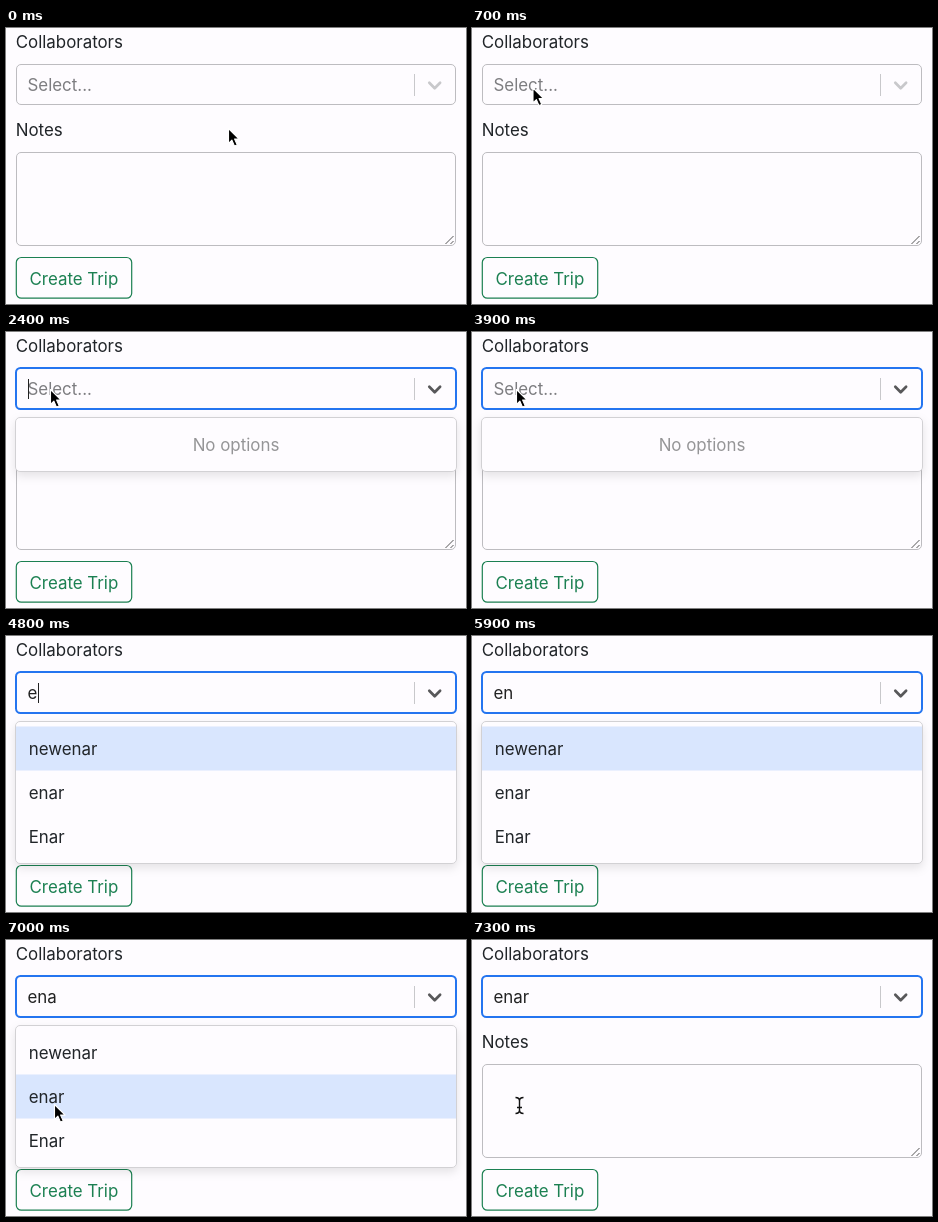
Animation, 460 px wide and 276 px high, one loop 8 s. Source, as an HTML page:

```html
<!DOCTYPE html>
<html lang="en">
<head>
<meta charset="utf-8">
<style>
  html, body { margin: 0; width: 460px; height: 276px; overflow: hidden; background: #fefcff; }
  svg { display: block; font: 16.9px Inter, sans-serif; fill: #212529; }
  .box { fill: #fefcff; stroke: #bdbcc0; }
  .menu { filter: drop-shadow(0 4px 5px rgba(0, 0, 0, .1)); }
  .menu rect { fill: #fefcff; stroke: #d2d1d4; }
  .line { fill: none; stroke: #555; }
</style>
</head>
<body>
<svg width="460" height="276" viewBox="0 0 460 276">
  <text x="9.7" y="20.3">Collaborators</text>
  <rect id="control" class="box" rx="4.5"/>
  <text id="value" x="21.5" y="63"></text>
  <path id="caret" class="line" style="stroke:#222" d="M0 47V67"/>
  <path d="M408.5 46V68" stroke="#c8c8cb"/>
  <path id="chevron" d="M423.3 54.8L428.7 60.2L434.1 54.8" fill="none" stroke-width="2.7" stroke-linecap="round" stroke-linejoin="round"/>

  <text x="9.7" y="108.3">Notes</text>
  <rect class="box" x="10.5" y="124.5" width="439" height="93" rx="4.5"/>
  <path class="line" d="M439.5 216L447.5 208M444.5 216L447.5 213"/>
  <rect x="10.3" y="229.5" width="115.4" height="40.7" rx="5" fill="#fefcff" stroke="#1c8052" stroke-width="1.2"/>
  <text x="23.5" y="256.5" fill="#1c8052">Create Trip</text>

  <g id="empty">
    <g class="menu"><rect x="9.5" y="85.5" width="441" height="54" rx="4.5"/></g>
    <text x="230" y="119" text-anchor="middle" fill="#959597">No options</text>
  </g>
  <g id="list">
    <g class="menu"><rect x="9.5" y="85.5" width="441" height="142" rx="4.5"/></g>
    <rect id="active" x="10" width="440" height="44" fill="#d9e6fe"/>
    <text x="22.7" y="119">newenar</text>
    <text x="22.7" y="163">enar</text>
    <text x="22.7" y="207">Enar</text>
  </g>

  <path id="arrow" d="M0 0V14.8L3.4 11.6L6 17.6L8.7 16.4L6.1 10.6H10.6Z" fill="#000" stroke="#fff" stroke-width="1.1" stroke-linejoin="round"/>
  <path id="beam" class="line" style="stroke:#111" stroke-width="1.4" d="M43.5 157.5Q47.5 157.5 47.5 161V170Q47.5 173.5 43.5 173.5M51.5 157.5Q47.5 157.5 47.5 161M47.5 170Q47.5 173.5 51.5 173.5M45 167.5H50"/>
</svg>
<script>
const LOOP = 8000, STEP = 100;
const FOCUS = 1400, PICK = 7100;
const NAME = 'enar';
const keyTimes = [4600, 5400, 6200];
const pointerPath = [
  [200, 222.5, 100.5], [700, 61, 60], [1200, 61, 60], [1500, 56, 55], [1700, 48, 57],
  [1800, 48, 57], [2000, 44.5, 57.5], [6200, 44.5, 57.5], [6600, 48.5, 164.5]
];

const $ = id => document.getElementById(id);
const set = (id, attrs) => Object.entries(attrs).forEach(([k, v]) => $(id).setAttribute(k, v));
const show = (id, on) => set(id, { visibility: on ? 'visible' : 'hidden' });
const clamp = v => Math.max(0, Math.min(1, v));
const mix = (a, b, p) => a + (b - a) * p;
const mixColor = (a, b, p) => `rgb(${a.map((v, i) => Math.round(mix(v, b[i], p)))})`;

function pointerAt(t) {
  const next = pointerPath.findIndex(k => k[0] > t);
  if (next === 0) return pointerPath[0].slice(1);
  if (next < 0) return pointerPath.at(-1).slice(1);
  const a = pointerPath[next - 1], b = pointerPath[next];
  const p = (t - a[0]) / (b[0] - a[0]), eased = p * p * (3 - 2 * p);
  return [mix(a[1], b[1], eased), mix(a[2], b[2], eased)];
}

function render(t) {
  const focused = t >= FOCUS, picked = t >= PICK;
  const typed = keyTimes.filter(k => t >= k).length;
  const text = picked ? NAME : NAME.slice(0, typed);
  const [x, y] = pointerAt(t);

  const inset = focused ? 10 : 10.5, grow = focused ? 1 : 0;
  set('control', {
    x: inset, y: inset + 26, width: 439 + grow, height: 40 + grow,
    style: focused
      ? `stroke-width:2;stroke:${mixColor([56, 138, 236], [36, 117, 240], clamp((t - 1500) / 200))}`
      : ''
  });
  set('chevron', { stroke: mixColor([200, 200, 203], [88, 88, 90], clamp((t - FOCUS) / 150)) });

  $('value').textContent = text || 'Select...';
  set('value', { fill: text ? '#222' : '#7d7d80' });

  const lastKey = typed ? keyTimes[typed - 1] : FOCUS;
  show('caret', focused && !picked && (t - lastKey) % 1000 < 500);
  const textWidth = text ? $('value').getComputedTextLength() : 0;
  set('caret', { transform: `translate(${Math.round(22 + textWidth) + .5} 0)` });

  show('empty', focused && !typed);
  show('list', typed && !picked);
  set('active', { y: y >= 134 ? 134.5 : 90.5 });

  show('arrow', (t < keyTimes[0] || t > keyTimes[2]) && !picked);
  set('arrow', { transform: `translate(${x} ${y})` });
  show('beam', picked);
}

function tick() {
  const t = performance.now() % LOOP;
  render(Math.floor(t / STEP) * STEP);
  requestAnimationFrame(tick);
}
tick();
</script>
</body>
</html>
```
